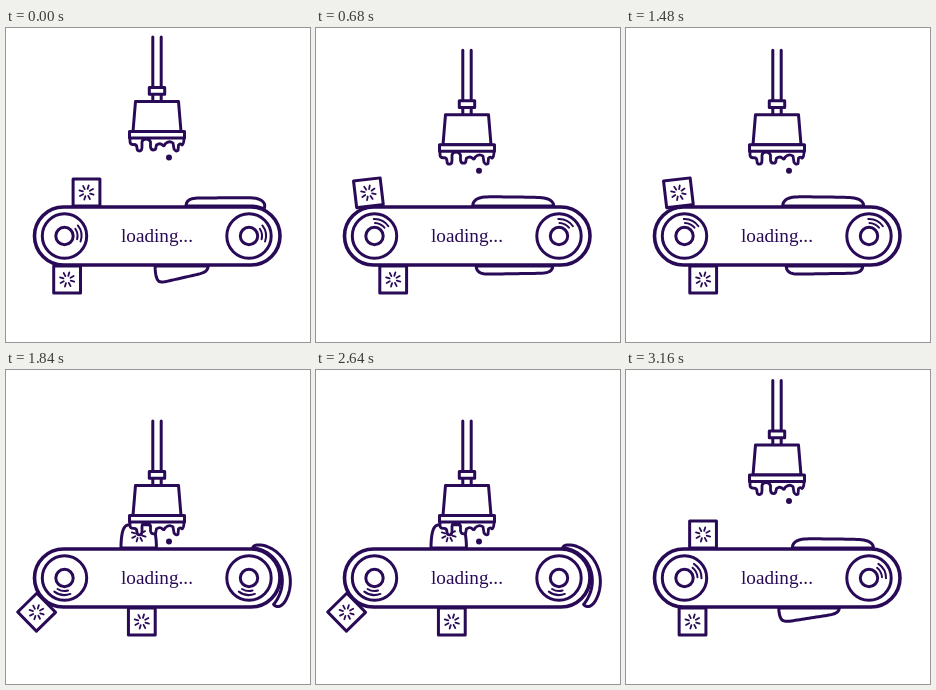
Recreate the animation shown at these times as an HTML page with a canvas. Size 304 by 314 pixels, loop 3.2 s.

```html
<!DOCTYPE html>
<html lang="en">
<head>
<meta charset="utf-8">
<title>Loading</title>
<style>
html, body { margin: 0; width: 100%; height: 100%; overflow: hidden; background: #fff; }
canvas { display: block; width: 304px; height: 314px; }
</style>
</head>
<body>
<canvas id="stage"></canvas>
<script>
const W = 304, H = 314, STEP = 40, STEPS = 20;
const INK = '#290a56', PAPER = '#fff';
const canvas = document.getElementById('stage');
const ctx = canvas.getContext('2d');
const ratio = window.devicePixelRatio || 1;
canvas.width = W * ratio;
canvas.height = H * ratio;

const { PI, sin, cos, min, max, abs, sqrt } = Math;
const clamp = v => min(1, max(0, v));
const smooth = v => { v = clamp(v); return v * v * (3 - 2 * v); };
const mix = (a, b, u) => a + (b - a) * u;

// Belt: two straights joined by half circles
const LEFT = 57.5, RIGHT = 245, MID = 208, R = 29;
const RUN = RIGHT - LEFT, ARC = PI * R;

// Point at distance s along the belt (0 = top of right bend), lifted by h
function onBelt(s, h) {
  const r = R + h;
  if (s < 0) return { x: RIGHT + s, y: MID - r, a: 0 };
  if (s < ARC) {
    const a = s / R;
    return { x: RIGHT + r * sin(a), y: MID - r * cos(a), a };
  }
  s -= ARC;
  if (s < RUN) return { x: RIGHT - s, y: MID + r, a: PI };
  s -= RUN;
  if (s < ARC) {
    const a = s / R;
    return { x: LEFT - r * sin(a), y: MID + r * cos(a), a: PI + a };
  }
  return { x: LEFT + s - ARC, y: MID - r, a: 0 };
}

// Stages of an item; n counts steps within a cycle
const climb = n => 275 + min(117.5, 3.75 * n + 0.00033 * n ** 4);
const climbTilt = n => 0.14 * sin(PI * min(1, n / 16));
const feed = n => -164.5 + 8.7 * n;
const leave = n => 168.3 + 5.33 * n;

function squash(n) {
  const u = smooth((n - 5) / 4);
  const centre = feed(min(n, 9)) + 4.8 * max(0, n - 9);
  const half = mix(13.5, 40.5, u);
  return { tail: centre - half, lead: centre + half, hTail: mix(26, 9.5, u), hLead: mix(26, 8.5, u), power: 7 };
}

function bend(n) {
  return {
    tail: -65 + 10 * n + 7 * sin(PI * n / 10),
    lead: min(13 + 9.6 * n, 113 + 3.7 * n),
    hTail: 8 - 4.5 * abs(sin(PI * n / 16)),
    hLead: 8.3 + 3.3 * max(0, n - 17),
    lift: 5 * max(0, sin(PI * n / 10))
  };
}

function unfold(n) {
  return { tail: 134 + 9.6 * n, lead: 187 + 4.4 * n, hTail: 6 + 4 * n, hLead: 18 + 1.6 * n, power: 10 + 4 * n };
}

function paint(width = 3) {
  ctx.fillStyle = PAPER;
  ctx.fill();
  ctx.lineWidth = width;
  ctx.stroke();
}

function star({ x, y, a }, size = 1) {
  ctx.beginPath();
  for (let i = 0; i < 8; i++) {
    const c = cos(a + 0.3 + i * PI / 4) * size, s = sin(a + 0.3 + i * PI / 4) * size;
    ctx.moveTo(x + c * 3.8, y + s * 3.8);
    ctx.lineTo(x + c * 7.4, y + s * 7.4);
  }
  ctx.lineWidth = 1.8;
  ctx.stroke();
}

function box(s, tilt = 0) {
  const p = onBelt(s, 14.5);
  p.a += tilt;
  ctx.save();
  ctx.translate(p.x, p.y);
  ctx.rotate(p.a);
  ctx.beginPath();
  ctx.rect(-13.4, -13.4, 26.8, 26.8);
  paint();
  ctx.restore();
  star(p);
}

function slab({ tail, lead, hTail, hLead, lift = 0, power = 10 }) {
  const n = 40;
  const at = (u, h) => {
    const p = onBelt(mix(tail, lead, u), 1 + h + lift * u ** 3);
    ctx.lineTo(p.x, p.y);
  };
  const ease = i => (1 - cos(PI * i / n)) / 2;
  ctx.beginPath();
  for (let i = 0; i <= n; i++) at(ease(i), 0);
  for (let i = n; i >= 0; i--) {
    const u = ease(i);
    const body = mix(hTail, hLead, u) + 0.3 * lift * sin(PI * u);
    at(u, body * sqrt(max(0, 1 - abs(2 * u - 1) ** power)));
  }
  ctx.closePath();
  paint();
  if (min(hTail, hLead) > 16) star(onBelt((tail + lead) / 2, 14.5), min(1, hTail / 24));
}

function circle(x, y, r) {
  ctx.beginPath();
  ctx.arc(x, y, r, 0, 2 * PI);
}

function wheel(x, turn) {
  circle(x, MID, 22.2);
  paint();
  circle(x, MID, 8.7);
  paint();
  ctx.lineWidth = 2;
  for (const r of [13, 17]) {
    const span = 0.02 * r + 0.16;
    ctx.beginPath();
    ctx.arc(x, MID, r, turn - span, turn + span);
    ctx.stroke();
  }
}

function belt(n) {
  ctx.beginPath();
  ctx.roundRect(LEFT - R, MID - R, RUN + 2 * R, 2 * R, R);
  paint(3.6);
  const turn = 2 * PI * n / STEPS - 0.17;
  wheel(58.5, turn);
  wheel(243, turn);
  ctx.fillStyle = INK;
  ctx.font = '19.2px "Liberation Serif", "Times New Roman", serif';
  ctx.fillText('loading...', 115, 214);
}

const drip = new Path2D('M124 0V4Q124.5 7 128 6.5Q131 6.5 131 10Q131 13 133.5 13Q136 13 136 9V4Q136.5 1 140 1' +
  'Q143.5 1 144.5 4V9Q145 12 147.5 12Q150 12 150 9L150.5 7Q154 4.5 156.5 7Q158.5 9 159 6Q163 2 167 5' +
  'L168 11Q170 14 172 12.5L172.5 7Q174 5 176 7Q178 6 178 0');

function press(n) {
  const cx = 151, floor = 166.5;
  const y = 9 + 32 * (1 - cos(2 * PI * n / STEPS));
  const crush = max(0, y + 101.5 - floor);
  const k = crush / 6;
  const foot = y + 101 - crush;

  if (abs(n - 10) > 2.5) {
    ctx.save();
    ctx.translate(0, foot);
    ctx.fillStyle = PAPER;
    ctx.fill(drip);
    ctx.lineWidth = 2.8;
    ctx.stroke(drip);
    circle(163, 19.5, 3);
    ctx.fillStyle = INK;
    if (foot + 22 < MID - R) ctx.fill();
    ctx.restore();
  }

  ctx.fillStyle = PAPER;
  ctx.fillRect(cx - 4, y, 8, 64);
  ctx.beginPath();
  for (const d of [-4.2, 4.2]) {
    ctx.moveTo(cx + d, y);
    ctx.lineTo(cx + d, y + 64);
  }
  ctx.lineWidth = 3;
  ctx.stroke();
  ctx.beginPath();
  ctx.rect(cx - 7.7, y + 50.5, 15.4, 6.8);
  paint();

  // Body bulges as the plate is pushed up
  const top = y + 64.5, base = foot - 6.5;
  const a = 21.5 - 2 * k, b = 24 + 6 * k;
  ctx.beginPath();
  ctx.moveTo(cx, top);
  ctx.arcTo(cx + a, top, cx + b, base - 4 * k, 6 * k);
  ctx.lineTo(cx + b, base - 4 * k);
  ctx.lineTo(cx + b - 2 * k, base);
  ctx.lineTo(cx - b + 2 * k, base);
  ctx.lineTo(cx - b, base - 4 * k);
  ctx.arcTo(cx - a, top, cx, top, 6 * k);
  ctx.closePath();
  paint();
  ctx.beginPath();
  ctx.roundRect(cx - 27.5 - k, foot - 6.5, 55 + 2 * k, 6.5, min(3, 3 * k));
  paint();
}

function leaf(side, angle, reach, len, size) {
  ctx.save();
  ctx.translate(151 + side * reach * cos(angle), 165 - reach * sin(angle));
  ctx.rotate(-side * 1.6 * angle);
  ctx.scale(size, size);
  ctx.beginPath();
  ctx.moveTo(-len, 0);
  ctx.quadraticCurveTo(0, -0.85 * len, len, 0);
  ctx.quadraticCurveTo(0, 0.85 * len, -len, 0);
  ctx.closePath();
  ctx.stroke();
  ctx.restore();
}

function splash(n) {
  if (abs(n - 10) > 2) return;
  const out = 4 * (n - 9), size = min(1, 1 - 0.4 * (n - 10));
  ctx.lineWidth = 2.2;
  for (let i = 0; i < 2; i++) leaf(-1, 0.4 - 0.3 * i, 57 + out, 4.5 - i, size);
  for (let i = 0; i < 3; i++) leaf(1, 0.49 - 0.18 * i, 54 + 4.5 * i + out, 6.2 - 1.2 * i, size);
}

function draw(now) {
  const n = Math.floor(now / STEP) % STEPS;
  ctx.setTransform(ratio, 0, 0, ratio, 0, 0);
  ctx.fillStyle = PAPER;
  ctx.fillRect(0, 0, W, H);
  ctx.strokeStyle = INK;
  ctx.lineJoin = ctx.lineCap = 'round';

  box(climb(n), climbTilt(n));
  if (n <= 5) box(feed(n));
  else slab(squash(n));
  slab(bend(n));
  if (n < 5) slab(unfold(n));
  else box(leave(n));
  belt(n);
  press(n);
  splash(n);
}

let start;
function frame(now) {
  if (start === undefined) start = now;
  draw(now - start);
  requestAnimationFrame(frame);
}
draw(0);
requestAnimationFrame(frame);
</script>
</body>
</html>
```
